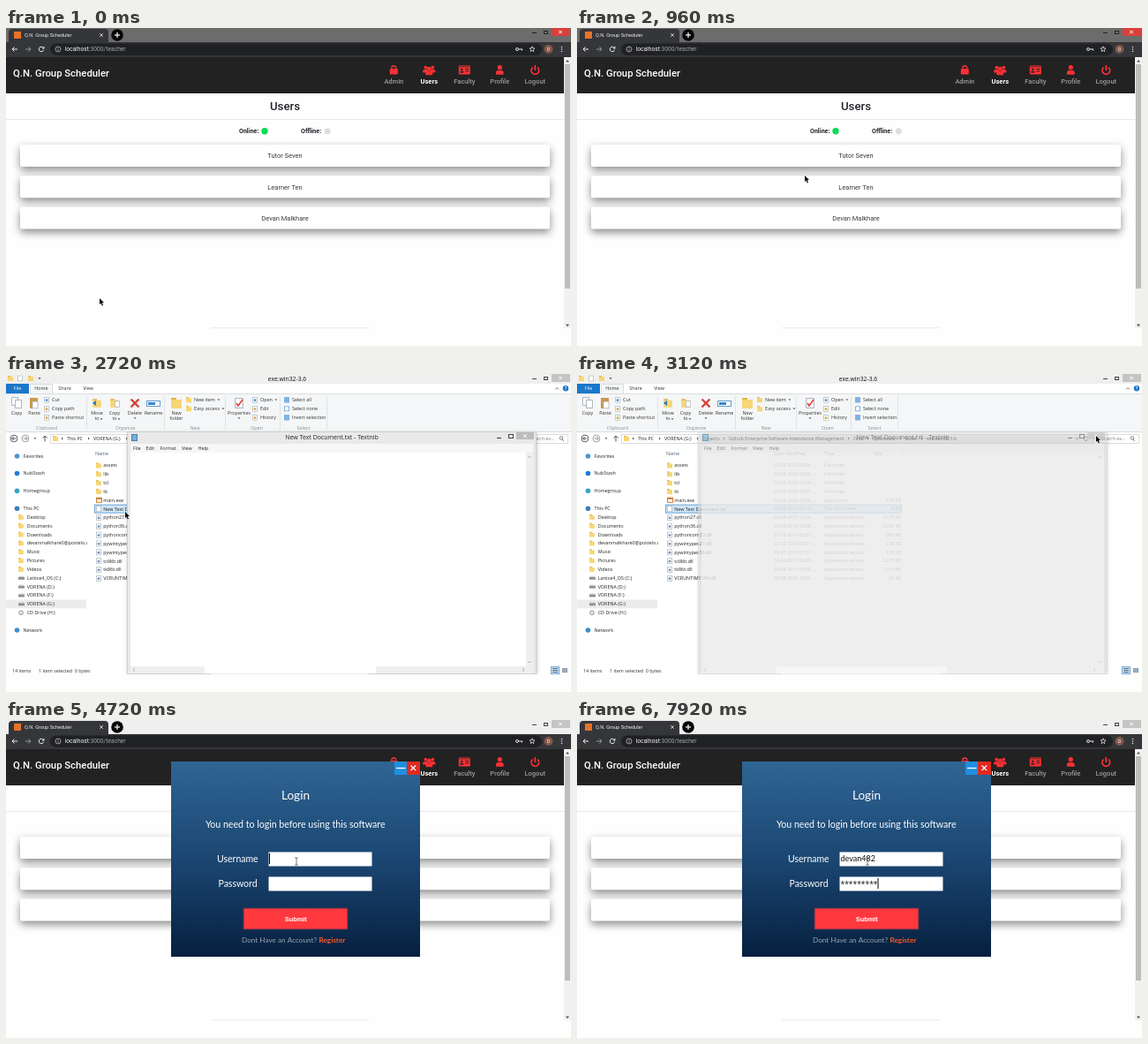
Write an HTML page with a canvas that moves like this. It is 640x360 px and loops after 8 s.

```html
<!DOCTYPE html>
<html lang="en">
<head>
<meta charset="utf-8">
<title>Desktop session</title>
<style>
html, body { margin: 0; width: 100%; height: 100%; overflow: hidden; background: #fff; }
canvas { display: block; width: 640px; height: 360px; }
</style>
</head>
<body>
<canvas id="stage" width="640" height="360"></canvas>
<script>
const c = document.getElementById('stage').getContext('2d');
const LOOP = 8000, STEP = 80;
const ROBOTO = 'Roboto, sans-serif', UI = '"Open Sans", sans-serif', LATO = 'Lato, sans-serif', ARIAL = '"Liberation Sans", sans-serif';
const APP = 'Q.N. Group Scheduler', DRIVE = 'VORENA', USER = 'devan482';

// ---------- helpers ----------
function text(s, x, y, size, color, font = UI, weight = 400, align = 'left') {
  c.font = `${weight} ${size}px ${font}`;
  c.fillStyle = color;
  c.textAlign = align;
  c.fillText(s, x, y + size * 0.35);
}
function mid(s, x, y, size, color, font, weight) { text(s, x, y, size, color, font, weight, 'center'); }
function rect(x, y, w, h, fill, stroke) {
  if (fill) { c.fillStyle = fill; c.fillRect(x, y, w, h); }
  if (stroke) { c.strokeStyle = stroke; c.lineWidth = 1; c.strokeRect(x + 0.5, y + 0.5, w - 1, h - 1); }
}
function round(x, y, w, h, r, fill) {
  c.beginPath(); c.roundRect(x, y, w, h, r);
  c.fillStyle = fill; c.fill();
}
function dot(x, y, r, fill) {
  c.beginPath(); c.arc(x, y, r, 0, 7);
  c.fillStyle = fill; c.fill();
}
function ring(x, y, r, color, w = 1, a = 0, b = Math.PI * 2) {
  c.beginPath(); c.arc(x, y, r, a, b);
  c.strokeStyle = color; c.lineWidth = w; c.stroke();
}
function line(color, w, ...p) {
  c.beginPath();
  for (let i = 0; i < p.length; i += 2) c.lineTo(p[i], p[i + 1]);
  c.strokeStyle = color; c.lineWidth = w; c.stroke();
}
function poly(fill, ...p) {
  c.beginPath();
  for (let i = 0; i < p.length; i += 2) c.lineTo(p[i], p[i + 1]);
  c.closePath(); c.fillStyle = fill; c.fill();
}
function cross(x, y, r, color, w = 1) {
  line(color, w, x - r, y - r, x + r, y + r);
  line(color, w, x + r, y - r, x - r, y + r);
}
function shadow(color, blur, dy, draw) {
  c.save();
  c.shadowColor = color; c.shadowBlur = blur; c.shadowOffsetY = dy;
  draw();
  c.restore();
}
function caretDown(x, y, color = '#555') { poly(color, x - 1.5, y - 0.8, x + 1.5, y - 0.8, x, y + 1); }
function faded(alpha, draw) {
  if (alpha <= 0) return;
  c.save(); c.globalAlpha *= alpha; draw(); c.restore();
}
function titleBar(active, h) {
  const ink = active ? '#222' : '#444';
  rect(0, 0, 640, h, active ? '#6c6c6c' : '#efefef');
  line(ink, 1, 596, 5.5, 601, 5.5);
  rect(609, 3, 5, 4, null, ink);
  rect(618, 0, 21, 9, active ? '#d9403c' : '#c4c4c4');
  cross(628, 4.5, 1.8, '#fff');
}

// ---------- browser ----------
const RED = '#ff3034';
function person(x, y, s = 1) {
  dot(x, y - 2.6 * s, 2.6 * s, RED);
  round(x - 4.4 * s, y + 0.6 * s, 8.8 * s, 4.8 * s, [3 * s, 3 * s, 1, 1], RED);
}
const navIcons = [
  x => { round(x - 4.5, 46, 9, 6.5, 1, RED); ring(x, 45.5, 2.6, RED, 1.5, Math.PI, 0); },
  x => { person(x - 4, 46.5, 0.72); person(x + 4, 46.5, 0.72); person(x, 48.5, 0.9); },
  x => {
    round(x - 6.5, 42.5, 13, 10, 1, RED);
    rect(x - 6, 43.5, 12, 0.8, '#222');
    dot(x - 3, 47, 1.3, '#222'); rect(x - 5, 49, 4, 1.6, '#222');
    rect(x + 1, 46, 4, 1, '#222'); rect(x + 1, 48.3, 4, 1, '#222');
  },
  x => person(x, 47.3),
  x => { ring(x, 48, 4.3, RED, 1.7, -0.9, Math.PI + 0.9); line(RED, 1.7, x, 42, x, 48); }
];
function browser(active) {
  rect(0, 0, 640, 340, '#fefefe');
  titleBar(active, 17);
  round(3, 1, 113, 18, [4, 4, 0, 0], '#35363a');
  rect(0, 16, 640, 17, '#35363a');
  rect(9, 4, 8, 8, '#e6742a');
  text(APP, 21, 8, 5.6, '#eee', ROBOTO);
  cross(108, 8, 1.8, '#ddd', 0.9);
  dot(126, 8, 6.8, '#050505');
  line('#fff', 1.2, 123, 8, 129, 8); line('#fff', 1.2, 126, 5, 126, 11);

  for (const [x, d, col] of [[10, -1, '#eee'], [25, 1, '#9a9a9a']]) {
    line(col, 1, x - 3, 24, x + 3, 24);
    line(col, 1, x + d * 0.5, 21.5, x + d * 3, 24, x + d * 0.5, 26.5);
  }
  ring(40, 24, 2.7, '#eee', 1, 0.3, 5.5);
  poly('#eee', 40.6, 23.4, 43.4, 23.4, 43.4, 20.6);
  round(50, 17.5, 557, 13.5, 7, '#202124');
  ring(59, 24, 3, '#bbb', 0.8);
  line('#bbb', 0.8, 59, 23.6, 59, 25.8); rect(58.6, 22.2, 0.8, 0.8, '#bbb');
  text('localhost', 66.5, 24, 6.7, '#f2f2f2', ROBOTO);
  text(':3000/teacher', 66.5 + c.measureText('localhost').width, 24, 6.7, '#a0a4a8', ROBOTO);
  ring(579, 24, 1.5, '#ddd', 1); line('#ddd', 1.2, 580.5, 24, 584.5, 24, 584.5, 25.5);
  const star = [];
  for (let i = 0; i < 11; i++) {
    const r = i % 2 ? 1.4 : 3.2, a = i * Math.PI / 5 - Math.PI / 2;
    star.push(596 + r * Math.cos(a), 24 + r * Math.sin(a));
  }
  line('#ddd', 0.8, ...star);
  dot(614.5, 24, 5, '#83574a');
  mid('D', 614.5, 24, 5.5, '#fff', ROBOTO);
  for (const y of [21.5, 24, 26.5]) dot(629.5, y, 0.8, '#ddd');

  rect(0, 33, 632, 41, '#222');
  text(APP, 8, 51.5, 11.3, '#fff', ROBOTO, 500);
  ['Admin', 'Users', 'Faculty', 'Profile', 'Logout'].forEach((s, i) => {
    const x = 439.3 + i * 40;
    navIcons[i](x);
    mid(s, x, 60.5, 7.5, i === 1 ? '#fff' : '#9b9b9b', ROBOTO, i === 1 ? 700 : 500);
  });
  mid('Users', 316, 88, 13.3, '#212529', ROBOTO, 500);
  rect(0, 103, 632, 1, '#e8e8e8');
  text('Online:', 264, 116.5, 7.1, '#212529', ROBOTO, 700);
  dot(293, 116.7, 3.7, '#0bdc55');
  text('Offline:', 334, 116.5, 7.1, '#212529', ROBOTO, 700);
  dot(364.3, 116.7, 3.5, '#dedede');
  ['Tutor Seven', 'Learner Ten', 'Devan Malkhare'].forEach((s, i) => {
    const y = 132 + i * 35.2;
    shadow('rgba(0,0,0,.45)', 10, 4, () => round(16, y, 600, 25, 2, '#fff'));
    mid(s, 316, y + 12.8, 7.5, '#33373b', ROBOTO);
  });

  rect(632, 33, 8, 307, '#f1f1f1');
  rect(633, 41, 6, 254, '#bdbdbd');
  poly('#505050', 634, 38.5, 638, 38.5, 636, 36);
  poly('#505050', 634, 335.5, 638, 335.5, 636, 338);
}

// ---------- file manager ----------
const S = 5.4;
function folder(x, y, k = 1) {
  rect(x - 3 * k, y - 3 * k, 3 * k, 2 * k, '#e3b549');
  rect(x - 3 * k, y - 2 * k, 6 * k, 5 * k, '#f6d675');
}
function page(x, y, k = 1, mark) {
  rect(x - 2.6 * k, y - 3.2 * k, 5.2 * k, 6.4 * k, '#9aa3ad');
  rect(x - 2.1 * k, y - 2.7 * k, 4.2 * k, 5.4 * k, '#fff');
  if (mark) dot(x, y + 0.4, 1.4, mark);
}
const files = [
  ['assets', '02-05-2020 05:06 ...'], ['lib', '02-05-2020 05:06 ...'],
  ['tcl', '02-05-2020 05:06 ...'], ['tk', '02-05-2020 05:07 ...'],
  ['main.exe', '02-05-2020 05:06 ...', '123 KB'],
  ['New Text Document.txt', '02-05-2020 05:12 ...', '0 KB'],
  ['python27.dll', '02-08-2019 10:26 ...', '2,578 KB'],
  ['python36.dll', '28-03-2018 04:08 ...', '3,226 KB'],
  ['pythoncom33.dll', '23-12-2019 02:51 ...', '395 KB'],
  ['pywintypes27.dll', '23-12-2019 02:51 ...', '135 KB'],
  ['pywintypes36.dll', '29-07-2019 07:51 ...', '110 KB'],
  ['tcl86t.dll', '16-06-2017 08:35 ...', '1,277 KB'],
  ['tk86t.dll', '16-06-2017 08:36 ...', '1,514 KB'],
  ['VCRUNTIME140.dll', '09-06-2016 10:46 ...', '82 KB']
];
const kinds = { exe: 'Application', txt: 'Text Document', dll: 'Application extens...' };
const rowY = i => 103.5 + i * 9.83;

function ribbon() {
  rect(0, 22, 640, 43, '#f5f6f7');
  rect(0, 22, 640, 1, '#dcdde0');
  rect(0, 65, 640, 1, '#d9dadc');
  rect(0, 11, 640, 11, '#fff');
  rect(0, 11, 26, 11, '#1a77c9');
  rect(27, 11, 26, 12, '#f5f6f7', '#dcdde0');
  mid('File', 13, 16.5, S, '#fff');
  mid('Home', 40, 16.5, S, '#333'); mid('Share', 66.5, 16.5, S, '#333'); mid('View', 93, 16.5, S, '#333');
  line('#666', 0.9, 622, 17.5, 624, 15.5, 626, 17.5);
  dot(634, 16.3, 3.2, '#1a77c9'); mid('?', 634, 16.3, 4.6, '#fff', UI, 700);
  const big = [[12, 'Copy'], [32, 'Paste'], [103, 'Move', 'to'], [123, 'Copy', 'to'], [146, 'Delete'],
    [167, 'Rename'], [193, 'New', 'folder'], [264, 'Properties']];
  for (const [x, a, b] of big) {
    mid(a, x, 44, S, '#333');
    if (b) mid(b, x, 50, S, '#333');
  }
  for (const [x, y] of [[108, 51], [128, 51], [146, 50], [264, 50]]) caretDown(x, y);
  page(10, 31, 1.5); page(14, 34, 1.5);
  rect(27, 27, 9, 12, '#c99a4b'); page(33, 35, 1.3);
  folder(103, 33, 1.6); poly('#2b78c5', 98, 33, 102, 30, 102, 36);
  folder(123, 33, 1.6); page(126, 34, 1.1);
  cross(146, 33, 4.5, '#d8413a', 2.4);
  rect(159, 30, 16, 7, '#fff', '#5b9bd5'); rect(161, 32, 8, 3, '#3d85c6');
  folder(193, 33, 2);
  page(264, 33, 1.8); line('#d33', 1.4, 261, 33, 263, 36, 268, 29);
  const small = [[52, 'Cut', 'Copy path', 'Paste shortcut'], [213, 'New item', 'Easy access'],
    [288, 'Open', 'Edit', 'History'], [324, 'Select all', 'Select none', 'Invert selection']];
  for (const [x, ...rows] of small) rows.forEach((s, i) => {
    const y = 29.3 + i * 10;
    text(s, x, y, S, '#333');
    const w = c.measureText(s).width;
    if (x === 213 || s === 'Open') caretDown(x + w + 4, y);
    if (x === 324) rect(x - 9, y - 3, 6, 6, i === 1 ? '#fff' : '#7fb2e5', '#7fb2e5');
    else if (x === 213) folder(x - 6, y);
    else page(x - 6, y, 1, i ? '#d9a441' : '#4a8ecf');
  });
  for (const x of [91, 179, 248, 310, 363]) rect(x, 25, 1, 38, '#e2e3e4');
  for (const [s, x] of [['Clipboard', 46], ['Organize', 135], ['New', 214], ['Open', 284], ['Select', 337]])
    mid(s, x, 60.7, S, '#8a8d91');
}

function addressBar() {
  for (const [x, d, col] of [[9, -1, '#4a4f55'], [22, 1, '#8f959b']]) {
    ring(x, 73, 3.9, col, 0.9);
    line(col, 1, x - d * 2.3, 73, x + d * 2.3, 73);
    line(col, 1, x + d * 0.3, 71, x + d * 2.3, 73, x + d * 0.3, 75);
  }
  caretDown(33, 73);
  line('#555', 1, 44, 76.5, 44, 70); line('#555', 1, 41.5, 72.5, 44, 70, 46.5, 72.5);
  rect(50, 68, 535, 11, '#fff', '#dcdcdc');
  folder(56, 73);
  const crumbs = [[69, 'This PC'], [99, DRIVE + ' (G:)'], [142, 'Projects'],
    [172, 'Github Enterprise Software Attendance Management'], [313, 'Final'], [335, 'Optimized'],
    [372, 'build'], [396, 'exe.win32-3.6']];
  for (const [x, s] of crumbs) {
    poly('#555', x - 6, 71.5, x - 6, 74.5, x - 4.2, 73);
    text(s, x, 73.3, 5.3, '#222');
  }
  line('#666', 0.9, 564.5, 72, 566.5, 74.2, 568.5, 72);
  ring(576.5, 73.3, 2.2, '#666', 0.9, 0.4, 5.6);
  rect(589, 68, 48, 11, '#fff', '#dcdcdc');
  text('Search ex...', 593, 73.3, S, '#777');
  ring(629, 72.5, 1.8, '#777', 0.9); line('#777', 0.9, 630, 74, 632, 76);
}

function sidebar() {
  c.save();
  c.beginPath(); c.rect(0, 82, 92, 250); c.clip();
  rect(0, 255.5, 91, 9.8, '#ececec');
  const heads = [['Favorites', 93, '#4e93d3'], ['NubStash', 112.5, '#1e7bd0'], ['Homegroup', 132.3, '#35a3c4'],
    ['This PC', 152.3, '#3f7fb5'], ['Network', 290, '#3b8fc9']];
  for (const [s, y, col] of heads) {
    dot(12.5, y, 2.8, col);
    text(s, 19.5, y, S, '#222');
  }
  const kids = ['Desktop', 'Documents', 'Downloads', 'devanmalkhare0@postelo.com', 'Music', 'Pictures', 'Videos',
    'Lattice4_OS (C:)', DRIVE + ' (D:)', DRIVE + ' (F:)', DRIVE + ' (G:)', 'CD Drive (H:)'];
  kids.forEach((s, i) => {
    const y = 162 + i * 9.83;
    if (i < 7) folder(17, y, 0.95);
    else if (i < 11) { rect(14, y - 1, 7, 3, '#8b9299'); rect(15, y - 2, 5, 1, '#c4c9cd'); }
    else { dot(17, y, 3, '#b9bfc6'); dot(17, y, 1, '#fff'); }
    text(s, 23.7, y, S, '#222');
  });
  c.restore();
}

function explorer(active, selected, hover) {
  rect(0, 0, 640, 340, '#fff');
  titleBar(active, 11);
  folder(5, 5); page(16, 5); folder(28, 5); caretDown(38, 5, '#333');
  mid('exe.win32-3.6', 318.5, 5.2, 6.8, '#111');
  ribbon();
  addressBar();
  sidebar();
  for (const [s, x] of [['Name', 101], ['Date modified', 223], ['Type', 280], ['Size', 336]])
    text(s, x, 90, S, '#4c607a');
  for (const x of [219, 277, 332, 368]) rect(x, 85, 1, 11, '#e6e9ee');
  poly('#9aa', 157, 85.5, 160, 85.5, 158.5, 84);
  files.forEach(([name, date, size], i) => {
    const y = rowY(i), ext = name.split('.')[1];
    if (i === 5) rect(100, y - 5, 268, 10, selected ? '#cfe6f8' : '#f3f3f3', selected ? '#74a9d6' : '#cfcfcf');
    else if (i === hover) rect(100, y - 5, 268, 10, '#e6f2fb', '#c3def2');
    if (!ext) folder(105, y);
    else if (ext === 'exe') { rect(102, y - 3, 7, 6, '#fff', '#d27a2d'); rect(102, y - 3, 7, 2, '#d27a2d'); }
    else page(105, y, 1.05, ext === 'dll' && '#6f93b8');
    text(name, 110.3, y, S, '#222');
    text(date, 223, y, 5.2, '#6d6d6d');
    text(kinds[ext] || 'File folder', 280, y, 5.2, '#6d6d6d');
    if (size) text(size, 367, y, 5.2, '#6d6d6d', UI, 400, 'right');
  });
  text('14 items', 7, 336, S, '#333');
  text('1 item selected  0 bytes', 37, 336, S, '#333');
  rect(617, 331, 10, 9, '#cfe6f8', '#6fa8d8');
  for (const y of [333, 335, 337]) rect(619, y, 6, 1, '#567');
  rect(630, 333, 6, 5, '#8fb5d3', '#999');
}

// ---------- text editor ----------
function editor() {
  shadow('rgba(0,0,0,.35)', 5, 1, () => rect(137.5, 65.5, 463, 274.5, '#e9e9e9'));
  rect(137, 65, 464, 275, null, '#cfcfcf');
  rect(142, 68, 7, 8, '#6fb3d9', '#4a7f9f');
  mid('New Text Document.txt - Textnib', 369, 72, 7, '#222');
  line('#444', 1.2, 556, 72.5, 561, 72.5);
  rect(569, 68, 6, 5, null, '#444');
  rect(578, 66, 20, 8, '#bcbcbc'); cross(588, 70, 1.8, '#fff');
  rect(141, 79, 456, 10, '#f7f7f7');
  for (const [s, x] of [['File', 144], ['Edit', 158.5], ['Format', 174.5], ['View', 199], ['Help', 217.5]])
    text(s, x, 84.2, S, '#222');
  rect(141, 89, 456, 250, '#fff');
  rect(589, 89, 8, 250, '#efefef');
  rect(141, 331, 456, 8, '#efefef');
  rect(225, 331, 194, 8, '#fff');
  line('#aaa', 0.9, 591, 95, 593, 93, 595, 95);
  line('#aaa', 0.9, 591, 325, 593, 327, 595, 325);
  line('#aaa', 0.9, 146, 333, 144, 335, 146, 337);
  line('#aaa', 0.9, 585, 333, 587, 335, 585, 337);
}

// ---------- login ----------
function login(name, stars, focus, blink) {
  const g = c.createLinearGradient(0, 47, 0, 268);
  g.addColorStop(0, '#2f6594'); g.addColorStop(0.5, '#1b4672'); g.addColorStop(1, '#06203f');
  rect(187, 47, 282, 221, g);
  rect(440, 47, 14, 15, '#1f8fe0'); line('#fff', 1.3, 442, 54.5, 452.5, 54.5);
  rect(454, 47, 15, 15, '#e02b20'); cross(461.3, 54.3, 2.8, '#fff', 1.3);
  mid('Login', 328, 85, 13.6, '#fff', LATO);
  mid('You need to login before using this software', 327.7, 118, 10.6, '#fff', LATO);
  text('Username', 239, 157.7, 10.5, '#fff', LATO);
  text('Password', 240.5, 185.7, 10.5, '#fff', LATO);
  rect(297.5, 149.5, 117, 16, '#fff'); rect(297.5, 177.5, 117, 16, '#fff');
  rect(268.5, 212.5, 119, 25, '#4a3252'); rect(269.5, 213.5, 117, 23, '#ff383d');
  mid('Submit', 328.3, 225, 7.4, '#fff', ARIAL, 700);
  text('Dont Have an Account?', 267, 249, 8.2, '#98a3b0', LATO);
  text('Register', 354.5, 249, 8.2, '#ff5a24', LATO, 700);
  text(name, 298.5, 157.2, 9, '#111', LATO);
  const end = name ? 298.5 + c.measureText(name).width : 298;
  for (let i = 0; i < stars; i++) text('*', 298.5 + i * 4.67, 186.5, 8.5, '#111');
  if (blink && focus === 'name') rect(end, 151, 1, 12, '#000');
  if (blink && focus === 'pass') rect(298.5 + stars * 4.67, 179, 1, 12, '#000');
}

// ---------- task previews ----------
function previews() {
  rect(6, 261, 212, 77, 'rgba(124,124,124,.96)', '#5e5e5e');
  rect(11, 265, 101, 68, '#a2a2a2', '#c2c2c2');
  dot(18, 272, 3.3, '#e0503c');
  text(APP + ' - Br...', 24, 272, 5.6, '#fff');
  rect(100, 268, 8, 8, '#d9403c'); cross(104, 272, 1.6, '#fff', 0.9);
  rect(14, 279, 93, 50, '#fdfdfd');
  rect(14, 279, 93, 3, '#666'); rect(14, 281.5, 93, 9, '#222');
  text(APP, 15, 286.5, 2, '#fff');
  for (let i = 0; i < 5; i++) rect(78 + i * 6, 285, 2, 2, RED);
  mid('Users', 60, 293, 2.4, '#222');
  mid('Online:      Offline:', 60, 297, 2, '#555');
  for (let i = 0; i < 3; i++) {
    rect(16, 299.5 + i * 5.2, 88, 3.4, '#fff', '#d0d0d0');
    mid('Tutor Seven', 60, 301.2 + i * 5.2, 2, '#555');
  }
  dot(120.5, 272, 3.3, '#e0503c');
  text('Window Capturer is sharing your ...', 126, 272, 5.15, '#fff');
  rect(117, 296, 91, 12, '#f8f8f8');
  text('Window Capturer is sharing your screen.', 123, 302, 2.8, '#555');
  rect(174, 299, 23, 6, '#1a73e8'); mid('Stop sharing', 185.5, 302, 2.8, '#fff');
  text('Hide', 200, 302, 2.8, '#1a73e8');
}

// ---------- pointer ----------
const path = [[0, 106, 306], [80, 106, 306], [880, 258, 167], [960, 258, 167], [1360, 599, 4], [1520, 599, 4],
  [1920, 138, 173], [2000, 136, 165], [2240, 135, 156], [2720, 135, 156], [3040, 588, 70], [3160, 588, 70],
  [3480, 84, 346], [3560, 80, 344], [3680, 68, 312], [3920, 66, 314], [4160, 180, 345], [4280, 190, 345], [4640, 329, 160], [LOOP, 329, 160]];
function pointerAt(t) {
  const i = path.findIndex(p => p[0] > t), [t0, x0, y0] = path[i - 1], [t1, x1, y1] = path[i];
  const u = (t - t0) / (t1 - t0), e = u * u * (3 - 2 * u);
  return [x0 + (x1 - x0) * e, y0 + (y1 - y0) * e];
}
function pointer(t) {
  const [x, y] = pointerAt(t);
  if (t >= 4640) {
    line('#555', 0.8, x, y - 4, x, y + 4);
    line('#555', 0.8, x - 1.7, y - 4, x + 1.7, y - 4);
    line('#555', 0.8, x - 1.7, y + 4, x + 1.7, y + 4);
    return;
  }
  c.save();
  c.translate(x, y);
  const shape = [0, 0, 0, 7, 1.6, 5.6, 2.8, 8.4, 4, 7.9, 2.8, 5.2, 5, 5.1];
  line('rgba(255,255,255,.9)', 1.2, ...shape, 0, 0);
  poly('#000', ...shape);
  c.restore();
}

// ---------- scene ----------
const ramp = (t, a, b) => Math.min(1, Math.max(0, (t - a) / (b - a)));
const typed = (t, start, gap, max) => Math.min(max, Math.max(0, Math.floor((t - start) / gap) + 1));

function draw(t) {
  rect(0, 0, 640, 360, '#fefefe');
  c.save();
  c.beginPath(); c.rect(0, 0, 640, 340); c.clip();
  if (t < 1680 || t >= 3840) {
    if (t >= 1520 && t < 1680) explorer(true, true, -1);
    faded(t < 1680 ? 1 - ramp(t, 1440, 1680) : 1, () => browser(t < 4320));
  } else {
    const active = t < 2400 || (t >= 3200 && t < 3360);
    explorer(active, t < 3360, t > 1840 && t < 2080 ? 7 : -1);
    if (t >= 2400 && t < 3200) faded(ramp(t, 2320, 2560) * (1 - ramp(t, 3040, 3200)), editor);
  }
  if ((t >= 3360 && t < 3840) || t >= 4320) {
    const name = USER.slice(0, typed(t, 5040, 112, 8)), stars = typed(t, 6240, 144, 9);
    const focus = t < 4640 ? '' : t < 6000 ? 'name' : 'pass';
    const last = t < 5040 ? 4640 : t < 5920 ? t : t < 6240 ? 6000 : t < 7440 ? t : 7440;
    login(name, stars, focus, (t - last) % 900 < 600);
  }
  if (t >= 3520 && t < 4080) faded(ramp(t, 3440, 3600) * (1 - ramp(t, 3920, 4080)), previews);
  rect(232, 339, 179, 1, '#ebebeb');
  pointer(t);
  c.restore();
}

function tick(now) {
  draw(Math.floor((now % LOOP) / STEP) * STEP);
  requestAnimationFrame(tick);
}
draw(0);
requestAnimationFrame(tick);
</script>
</body>
</html>
```
